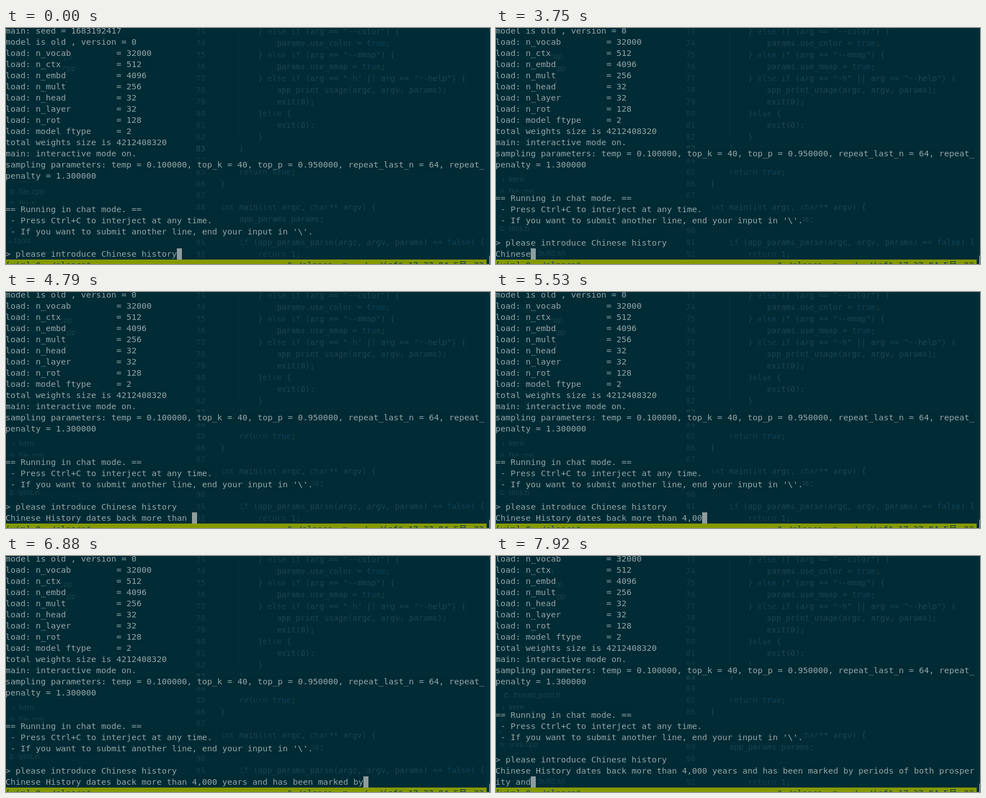
These frames come from a looping animation (864 by 423 pixels, 8000 ms). An HTML page with a canvas:

```html
<!DOCTYPE html>
<html lang="en">
<head>
<meta charset="utf-8">
<title>Terminal chat</title>
<style>
  html, body { margin: 0; width: 100%; height: 100%; overflow: hidden; background: #012b35; }
  canvas { display: block; }
</style>
</head>
<body>
<canvas id="stage" width="864" height="423"></canvas>
<script>
const ctx = document.getElementById('stage').getContext('2d');
const LOOP = 8000, COLS = 95, ROWS = 21, CELL = 9, ROW = 20, LEFT = -1, TOP = -5;
const MONO = '"DejaVu Sans Mono", "Noto Sans CJK SC", "Noto Sans CJK", monospace';
const TERM_FONT = '14.95px ' + MONO, CODE_FONT = '14px ' + MONO;
const BG = '#012b35', MASK = 'rgba(1,43,53,.82)', FG = '#95a5a6', CURSOR = '#8f9d9e';

const param = (name, value) => ('load: ' + name).padEnd(22) + '= ' + value;
const log = [
  'main: seed = 1683192417',
  'model is old , version = 0',
  param('n_vocab', 32000), param('n_ctx', 512), param('n_embd', 4096), param('n_mult', 256),
  param('n_head', 32), param('n_layer', 32), param('n_rot', 128), param('model ftype', 2),
  'total weights size is 4212408320',
  'main: interactive mode on.',
  'sampling parameters: temp = 0.100000, top_k = 40, top_p = 0.950000, repeat_last_n = 64, repeat_',
  'penalty = 1.300000',
  '', '',
  '== Running in chat mode. ==',
  ' - Press Ctrl+C to interject at any time.',
  " - If you want to submit another line, end your input in '\\'.",
  '',
  '> please introduce Chinese history'
];

// Reply tokens with the time at which each one appears
const ENTER = 1200;
const tokens = [
  [3750, 'Chinese'], [3900, ' History'], [4200, ' dates'], [4350, ' back'], [4500, ' more'],
  [4640, ' than'], [4790, ' '], [5090, '4'], [5240, ','], [5380, '0'], [5530, '0'], [5830, '0'],
  [5980, ' years'], [6130, ' and'], [6280, ' has'], [6430, ' been'], [6580, ' marked'],
  [6880, ' by'], [7030, ' periods'], [7180, ' of'], [7320, ' both'], [7470, ' prosper'],
  [7620, 'ity'], [7920, ' and']
];

// Editor showing through the translucent terminal
const code = [
  '        } else if (arg == "--color") {',
  '            params.use_color = true;',
  '        } else if (arg == "--mmap") {',
  '            params.use_mmap = true;',
  '        } else if (arg == "-h" || arg == "--help") {',
  '            app_print_usage(argc, argv, params);',
  '            exit(0);',
  '        }else {',
  '            exit(0);',
  '        }',
  '    }',
  '',
  '    return true;',
  '}',
  '',
  'int main(int argc, char** argv) {',
  '    app_params params;',
  '',
  '    if (app_params_parse(argc, argv, params) == false) {',
  '        return 1;'
];
const files = ('graph.h kvstorage.h kvstorage.cpp model_imp.cpp model_imp.h model.cpp op.cpp op.h tensor.cpp ' +
  'tensor.h thread_pool.cpp thread_pool.h kern file.cpp file.h utils.cpp utils.h tools android_build.sh').split(' ');

function text(str, x, y, font, color) {
  ctx.font = font;
  ctx.fillStyle = color;
  ctx.fillText(str, x, y);
}

function box(x, y, w, h, color) {
  ctx.fillStyle = color;
  ctx.fillRect(x, y, w, h);
}

function cells(str, x, y, color) {
  [...str].forEach((ch, i) => ch !== ' ' && text(ch, x + i * CELL, y, TERM_FONT, color));
}

function codeColor(word) {
  if (/^(true|false)$/.test(word)) return '#0f4458';
  if (/^(else|if|return|int|char)$/.test(word)) return '#153f50';
  return '#1b4650';
}

function drawEditor() {
  box(417, 0, 1, 205, '#0b333d');
  code.forEach((line, i) => {
    const y = 11 + i * 21;
    text(73 + i, 339, y, CODE_FONT, i === 10 ? '#24505a' : '#143e48');
    for (const m of line.matchAll(/\w+|[^\w\s]+/g))
      text(m[0], 382.5 + m.index * 8.43, y, CODE_FONT, codeColor(m[0]));
  });
  files.forEach((name, i) => {
    const y = 11 + i * 22.06, nested = i < 12, folder = !name.includes('.');
    const x = nested ? 31 : name === 'tools' ? 15 : 23;
    const icon = name === 'tools' ? '⌄' : folder ? '›' : name.endsWith('.sh') ? '$' : name.endsWith('.h') ? 'C' : 'G';
    text(name, x, y, '13px Inter, sans-serif', '#18424c');
    text(icon, x - (folder ? 12 : 17), y, 'bold 12px Inter, sans-serif', '#123e4b');
  });
}

function drawStatus() {
  const color = '#0a3a58', y = 430, x = 502;
  box(0, 415, 858, 8, '#859900');
  cells('[vim] 0:~/alpaca*', LEFT, y, color);
  cells('"./alpaca -m ../../inf" 17:37 04-5  -23', x, y, color);
  text('月', x + 34 * CELL, y, '15px "Noto Sans CJK SC", "Noto Sans CJK", sans-serif', color);
}

function screenAt(t) {
  if (t < ENTER) return log;
  const reply = tokens.filter(([at]) => at <= t).map(([, str]) => str).join('');
  const lines = [...log, reply.slice(0, COLS)];
  if (reply.length > COLS) lines.push(reply.slice(COLS));
  return lines.slice(-ROWS);
}

function draw(now) {
  const lines = screenAt(now % LOOP);
  box(0, 0, 864, 423, BG);
  drawEditor();

  const last = lines[ROWS - 1].length;
  const cursorCol = Math.min(last, COLS - 1);
  lines.forEach((line, i) => {
    const y = TOP + i * ROW;
    for (const run of line.matchAll(/\S+( \S+)*/g))
      box(LEFT + run.index * CELL, y, run[0].length * CELL, ROW, MASK);
    cells(line, LEFT, y + 15, FG);
  });

  const cx = LEFT + cursorCol * CELL, cy = TOP + (ROWS - 1) * ROW;
  box(cx, cy, CELL, ROW, CURSOR);
  if (last > cursorCol) cells(lines[ROWS - 1][cursorCol], cx, cy + 15, BG);

  drawStatus();
  box(859, 0, 5, 423, '#02303a');
  box(863, 408, 1, 15, '#b9c4c6');
  requestAnimationFrame(draw);
}
draw(0);
</script>
</body>
</html>
```
